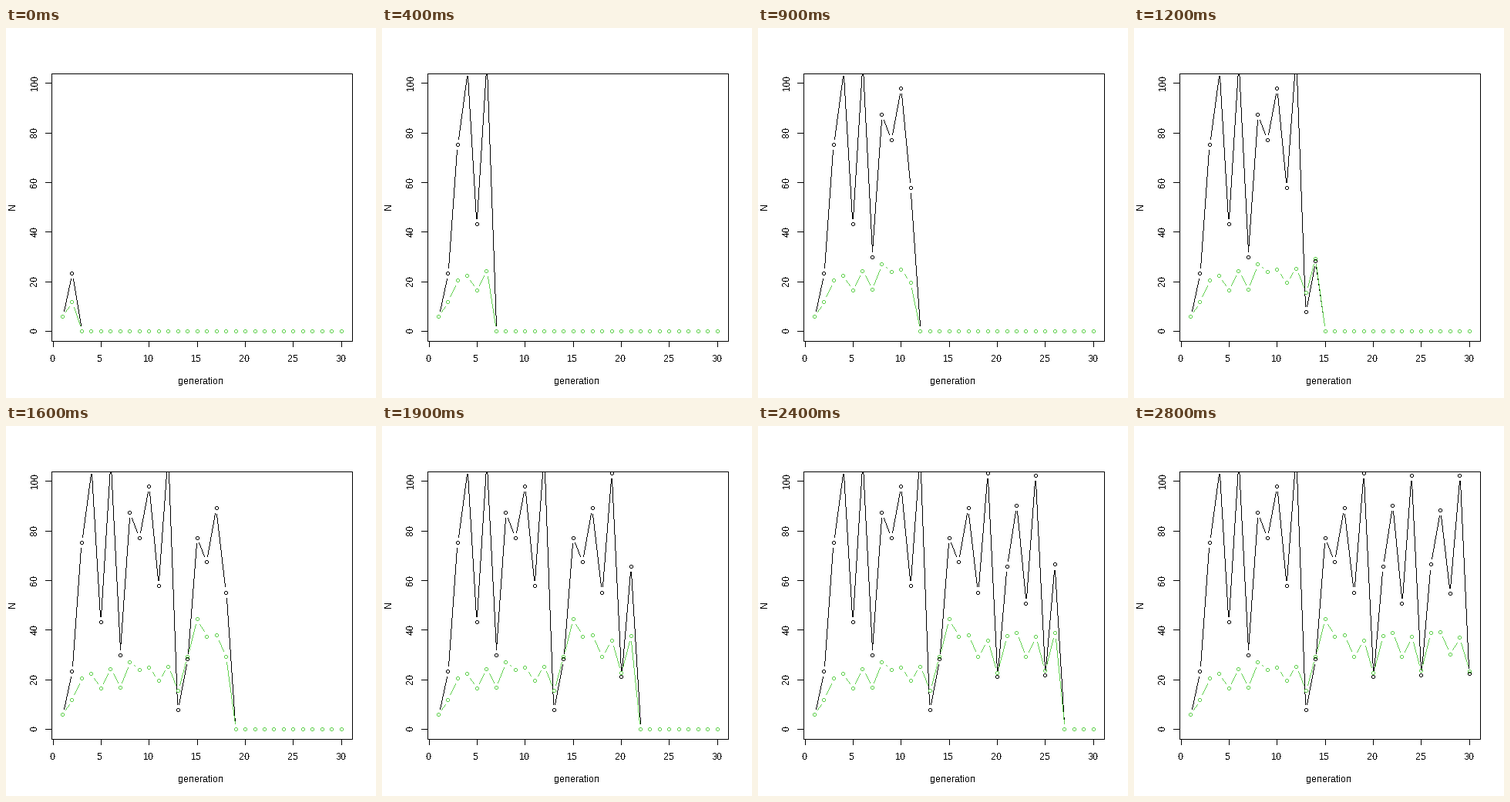
Recreate the animation shown at these times as a matplotlib script. Size 480x480 px, loop 2900 ms.

```python
import matplotlib.pyplot as plt
import numpy as np
from matplotlib.animation import FuncAnimation
from matplotlib.collections import PolyCollection
from matplotlib.patches import Rectangle

SIZE, DPI = 480, 100
PX = 72 / DPI                       # one pixel in points
LEFT, RIGHT, TOP, BOTTOM = 59.04, 449.76, 59.04, 406.56
LINE = 14.4                         # text line height
GAP = LINE / 2                      # space between a point and its line
GENERATIONS = 30
GREEN = "#61D04F"

plt.rcParams["font.family"] = "Liberation Sans"
plt.rcParams["font.size"] = 12 * PX
plt.rcParams["text.hinting"] = "native"
plt.rcParams["text.hinting_factor"] = 1
plt.rcParams["text.antialiased"] = False

fig = plt.figure(figsize=(SIZE / DPI, SIZE / DPI), dpi=DPI, facecolor="white")
ax = fig.add_axes([0, 0, 1, 1])
ax.set(xlim=(0, SIZE), ylim=(SIZE, 0))
ax.axis("off")


def compete(n1=6.0, n2=6.0, r1=3.2, r2=1.1, k1=100, k2=120, a12=0.6, a21=1.2):
    """Sizes of two species under discrete logistic competition."""
    sizes = []
    for _ in range(GENERATIONS):
        sizes.append((n1, n2))
        n1, n2 = (n1 + r1 * n1 * (1 - (n1 + a12 * n2) / k1),
                  n2 + r2 * n2 * (1 - (n2 + a21 * n1) / k2))
    return np.array(sizes).T


def to_x(gen):
    return LEFT + (gen + 0.16) / 31.32 * (RIGHT - LEFT)


def to_y(value):
    return BOTTOM - (value + 4) / 108 * (BOTTOM - TOP)


def stroke(xs, ys):
    ax.plot(np.floor(xs) + 0.5, np.floor(ys) + 0.5, color="black", lw=PX,
            solid_capstyle="projecting", solid_joinstyle="miter",
            snap=False, zorder=1)


def label(x, y, text, angle=0):
    nudge = -1 if angle else 1
    ax.text(x - 1, y + nudge, text, ha="center", va="baseline",
            rotation=angle, rotation_mode="anchor", color="black")


def draw_axes():
    stroke([LEFT, RIGHT, RIGHT, LEFT, LEFT], [TOP, TOP, BOTTOM, BOTTOM, TOP])
    for gen in range(0, 31, 5):
        x = to_x(gen)
        stroke([x, x], [BOTTOM, BOTTOM + LINE / 2])
        label(x, BOTTOM + 1.8 * LINE, str(gen))
    for value in range(0, 101, 20):
        y = to_y(value)
        stroke([LEFT, LEFT - LINE / 2], [y, y])
        label(LEFT - 1.2 * LINE, y, str(value), 90)
    label((LEFT + RIGHT) / 2, BOTTOM + 3.8 * LINE, "generation")
    label(LEFT - 3.2 * LINE, (TOP + BOTTOM) / 2, "N", 90)


SQUARE = np.array([(0, 0), (1, 0), (1, 1), (0, 1)])
RING = np.array([(a, b) for a in range(-2, 3) for b in range(-2, 3)
                 if 4 <= a * a + b * b <= 5])


def segment(p, q):
    """Pixels of a one-pixel line, shortened at both ends."""
    dist = np.hypot(*(q - p))
    if dist <= 2 * GAP:
        return np.empty((0, 2))
    step = (q - p) * GAP / dist
    start, end = np.floor(p + step), np.floor(q - step)
    count = int(np.abs(end - start).max())
    along = np.linspace(0, 1, count + 1)[:, None]
    return np.floor(start + along * (end - start) + 0.5)


class Series:
    def __init__(self, values, color, zorder):
        self.values = values
        self.marks = PolyCollection([], facecolors=color, linewidths=0,
                                    edgecolors="none", zorder=zorder)
        ax.add_collection(self.marks, autolim=False)
        self.marks.set_clip_path(Rectangle((59, 59), 391, 348,
                                           transform=ax.transData))

    def show(self, count):
        gens = np.arange(1, GENERATIONS + 1)
        shown = np.where(gens <= count, self.values, 0)
        points = np.column_stack([to_x(gens), to_y(shown)])
        lines = [segment(p, q) for p, q in zip(points[:-1], points[1:])]
        rings = [np.floor(p) + RING for p in points]
        pixels = np.concatenate(lines + rings)
        self.marks.set_verts(pixels[:, None, :] + SQUARE)


draw_axes()
first, second = compete()
series = [Series(first, "black", 3), Series(second, GREEN, 4)]


def update(step):
    for s in series:
        s.show(step + 2)
    return []


anim = FuncAnimation(fig, update, frames=GENERATIONS - 1, interval=100,
                     repeat=True, repeat_delay=0, blit=False)
plt.show()
```
